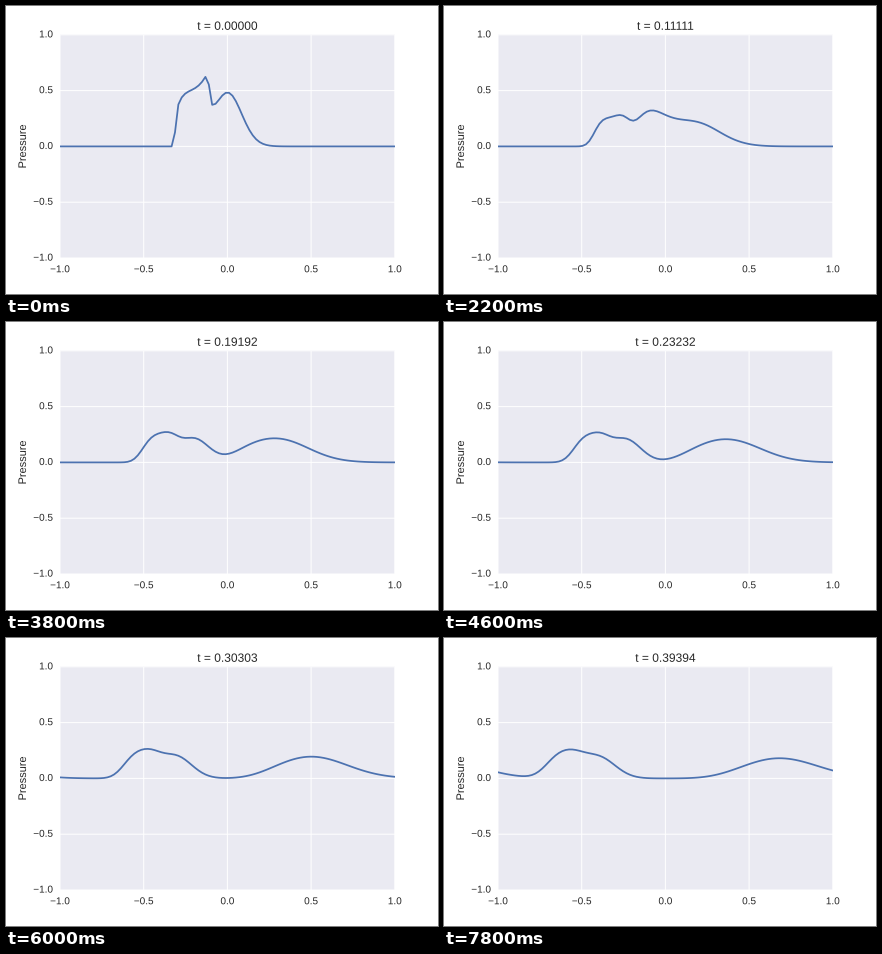
Write a matplotlib script that moves like this. It is 432 px wide and 288 px high and loops after 8000 ms.

```python
import numpy as np
import matplotlib.pyplot as plt
from matplotlib.animation import FuncAnimation
from matplotlib.patheffects import Normal

FRAMES, INTERVAL = 40, 200
N = 100
CFL = 0.5
INK = "0.15"

plt.rcParams.update({
    "font.family": "Liberation Sans",
    "text.color": INK,
    "text.hinting": "none",
    "path.snap": False,
    "axes.labelcolor": INK,
    "axes.facecolor": "#EAEAF2",
    "axes.edgecolor": "white",
    "axes.linewidth": 0,
    "axes.axisbelow": True,
    "axes.grid": True,
    "grid.color": "white",
    "grid.linewidth": 1,
    "grid.linestyle": "-",
    "axes.titlesize": 12,
    "axes.titlepad": 5,
    "axes.labelsize": 11,
    "axes.labelpad": 5,
    "ytick.alignment": "center",
    "lines.solid_capstyle": "round",
})

x = np.linspace(-1, 1, N)
times = np.linspace(0, 1, N)


def initial_pressure():
    """Gaussian hump plus a square pulse on [-0.3, -0.1]."""
    square = (x > -0.3) & (x < -0.1)
    return 0.5 * np.exp(-80 * x**2) + 0.5 * square


def step(left, right):
    """Advance both characteristics in one ascending upwind sweep."""
    for i in range(N):
        left[i] += CFL * (left[(i + 1) % N] - left[i])
        # right[i - 1] is already updated, which doubles speed and smears more
        right[i] -= CFL * (right[i] - right[i - 1])


def solve():
    left = initial_pressure() / 2
    right = left.copy()
    states = []
    for _ in range(FRAMES):
        step(left, right)
        states.append(left + right)
    return states


def tick_text(value, _):
    return f"{value:.1f}".replace("-", "\u2212")


states = solve()

fig = plt.figure(figsize=(6, 4), dpi=72, facecolor="white")
ax = fig.add_axes([0.125, 0.125, 0.775, 0.775])
ticks = np.linspace(-1, 1, 5)
ax.set(xlim=(-1, 1), ylim=(-1, 1), xticks=ticks, yticks=ticks)
ax.tick_params(length=0, pad=7, labelsize=10, labelcolor=INK)
for axis in (ax.xaxis, ax.yaxis):
    axis.set_major_formatter(tick_text)

line, = ax.plot(x, states[0], color="#4C72B0", linewidth=1.75)
title = ax.set_title("")
label = ax.set_ylabel("Pressure")

# Outlined text keeps its sub-pixel position
for text in (title, label, *ax.get_xticklabels(), *ax.get_yticklabels()):
    text.set_path_effects([Normal()])


def update(frame):
    line.set_ydata(states[frame])
    title.set_text(f"t = {times[frame]:.5f}")
    return line, title


anim = FuncAnimation(fig, update, frames=FRAMES, interval=INTERVAL,
                     repeat=True, repeat_delay=0, blit=False)
plt.show()
```
